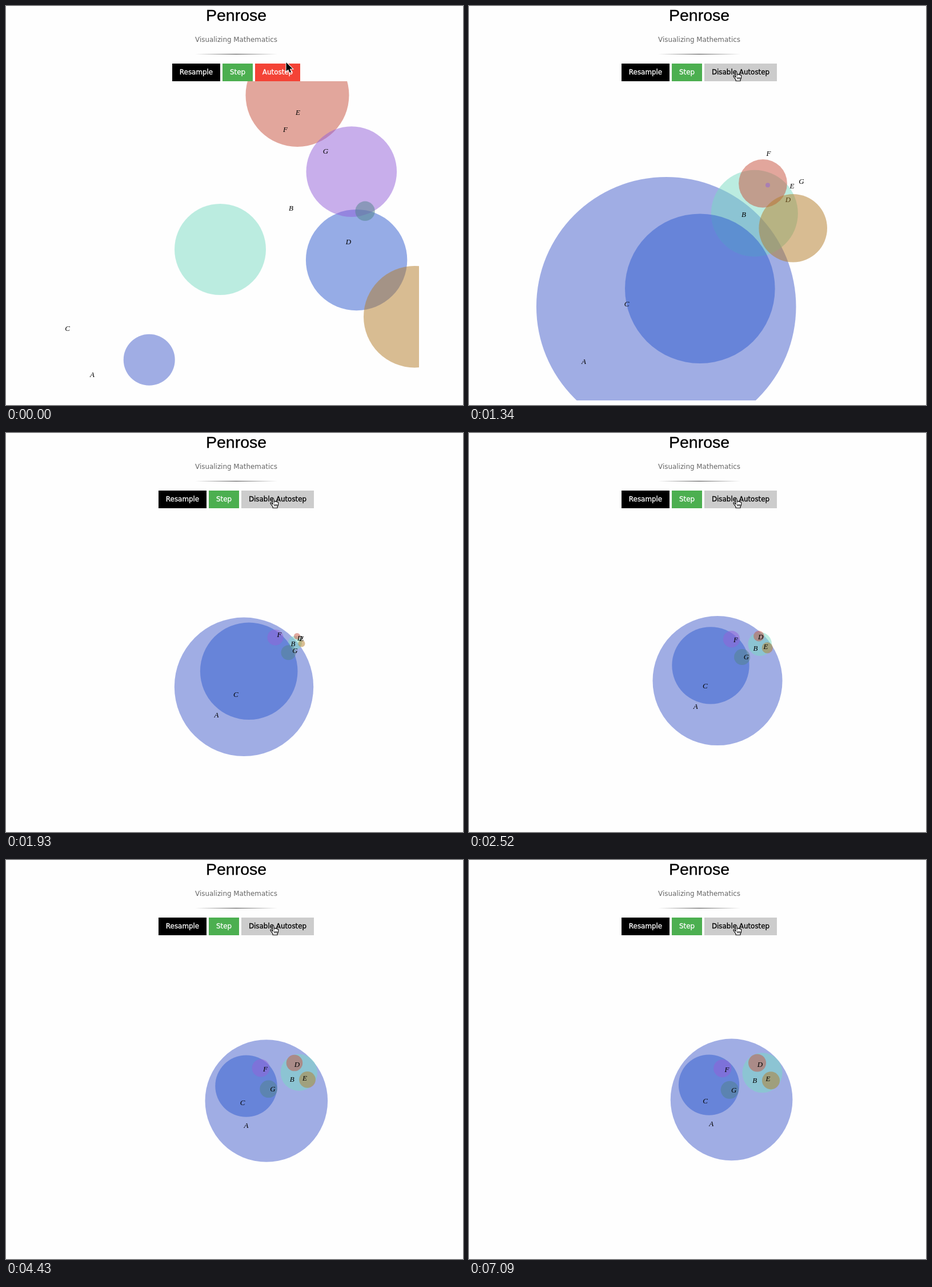
Animation, 800 px wide and 700 px high, one loop 7990 ms. Source, as an HTML page with a canvas:

```html
<!DOCTYPE html>
<html lang="en">
<head>
<meta charset="utf-8">
<title>Penrose</title>
<style>
html, body { margin: 0; width: 800px; height: 700px; overflow: hidden; background: #fefefe; }
canvas { display: block; }
</style>
</head>
<body>
<canvas id="stage" width="800" height="700"></canvas>
<script>
const ctx = document.getElementById('stage').getContext('2d');
const LOOP = 7990, START = 1340, STEP = 147.4, LAST = 39;
const NESTED = 4; // optimizer step at which every set has found its parent
const LEAF = 15.7; // settled radius of the innermost sets
const SANS = '11.9px "DejaVu Sans", Verdana, sans-serif';

// Circles are [x, y, radius]: random sample, first step, nested, settled.
// Labels are [x, y]; "seat" is the label's resting place in units of the radius.
const sets = [
  { name: 'A', rgb: '68,95,203', seat: [-0.33, 0.4],
    sample: [250.7, 620.7, 45], first: [345.2, 527.3, 227.3], nested: [416.5, 445.3, 121.7], settled: [459.9, 420.2, 106.8],
    sampleLabel: [151, 647], firstLabel: [201, 623.5] },
  { name: 'B', rgb: '123,219,195', seat: [-0.38, 0.38],
    sample: [375, 427, 80], first: [499.8, 363.8, 76], nested: [506, 368, 12], settled: [513.6, 373.3, 35.5],
    sampleLabel: [499, 355], firstLabel: [481, 366] },
  { name: 'C', rgb: '49,93,207', seat: [-0.12, 0.54],
    sample: [613.6, 445.6, 88.7], first: [404.3, 495.8, 131.3], nested: [425.2, 417.8, 85.3], settled: [420, 394.4, 53.1],
    sampleLabel: [107.5, 566], firstLabel: [276, 523] },
  { name: 'D', rgb: '199,81,61', seat: [0.32, 0.16],
    sample: [510, 156.5, 90.5], first: [514.5, 311.3, 42.4], nested: [509.5, 356.5, 5.5], settled: [504.5, 356, LEAF],
    sampleLabel: [599.5, 414], firstLabel: [558.5, 340] },
  { name: 'E', rgb: '179,125,41', seat: [-0.32, -0.19],
    sample: [715.2, 545.2, 89.2], first: [567.2, 389.8, 59.8], nested: [517.5, 369.5, 6], settled: [528.6, 387, LEAF],
    sampleLabel: [511, 187], firstLabel: [565.5, 316] },
  { name: 'F', rgb: '147,97,217', seat: [0.5, 0.12],
    sample: [604.8, 290.6, 79.3], first: [523, 314.2, 4], nested: [471.5, 358.7, 14], settled: [443.5, 365.6, LEAF],
    sampleLabel: [489, 217], firstLabel: [524.5, 258.5] },
  { name: 'G', rgb: '81,131,138', seat: [0.48, 0.03],
    sample: [628.6, 359.8, 17.2], first: [535, 345, 0], nested: [494.5, 385.3, 13], settled: [456, 403.5, LEAF],
    sampleLabel: [559.5, 254.5], firstLabel: [582, 308] },
];

const arrow = new Path2D('M0 0V15.5L3.6 12.2 6 17.8 8.6 16.7 6.2 11.2H11.2Z');
const hand = new Path2D('M4.5 11L1.8 8.2C.2 8 0 9.2 .8 10.2L4.6 15.5V17.5H12.5V15.5C14 13.5 14.5 11 14.3 8.2' +
  'C14.2 6.6 12 6.5 12 7.8C12 6 9.5 5.6 9.4 7C9.2 5.3 7 5 6.8 6.6L6.2 2C6 .2 3.7 .4 3.9 2Z');
const creases = new Path2D('M7.4 11v3.6M9.5 11v3.6M11.6 11v3.6');

const mix = (a, b, part) => a + (b - a) * part;

function text(str, x, y, font, color, weight = 0) {
  ctx.font = font;
  ctx.fillStyle = ctx.strokeStyle = color;
  ctx.fillText(str, x, y);
  if (weight) {
    ctx.lineWidth = weight;
    ctx.strokeText(str, x, y);
  }
}

function button(str, x, w, fill, color) {
  ctx.fillStyle = fill;
  ctx.fillRect(x, 101, w, 31);
  text(str, x + w / 2, 120, SANS, color, 0.3);
}

function drawHeader(t) {
  text('Penrose', 403, 26, '28.5px "Liberation Sans", Helvetica, Arial, sans-serif', '#000', 0.3);
  text('Visualizing Mathematics', 403, 63, SANS, '#666');
  const rule = ctx.createLinearGradient(331, 0, 475, 0);
  rule.addColorStop(0, 'rgba(0,0,0,0)');
  rule.addColorStop(0.5, 'rgba(0,0,0,.75)');
  rule.addColorStop(1, 'rgba(0,0,0,0)');
  ctx.fillStyle = rule;
  ctx.fillRect(331, 84, 144, 1);

  const running = t >= START, hover = t >= 890;
  const x = running ? 267 : 291;
  button('Resample', x, 84, '#000', '#fff');
  button('Step', x + 88, 53, '#4caf50', '#fff');
  button(running ? 'Disable Autostep' : 'Autostep', x + 145, running ? 127 : 79,
    hover ? '#ccc' : '#f44336', hover ? '#000' : '#fff');
}

// Quick jump into the parent set, then exponential settling
function circleAt({ first, nested, settled }, step) {
  if (step < NESTED) {
    const part = (1 - 0.6 ** step) / (1 - 0.6 ** NESTED);
    return first.map((v, k) => mix(v, nested[k], part));
  }
  const radiusDecay = nested[2] > settled[2] ? 0.82 : 0.89;
  const decay = [0.87, 0.87, radiusDecay];
  return settled.map((v, k) => mix(v, nested[k], decay[k] ** (step - NESTED)));
}

// The label drifts from its first place to its seat in the circle
function labelAt(set, circle, step) {
  return set.seat.map((seat, k) => {
    const gap = set.firstLabel[k] - set.first[k] - seat * set.first[2];
    return circle[k] + seat * circle[2] + gap * 0.58 ** step;
  });
}

function drawDiagram(t) {
  const step = Math.min(LAST, Math.floor((t - START + 11) / STEP));
  ctx.save();
  ctx.beginPath();
  ctx.rect(83, 132, 640, 560);
  ctx.clip();
  for (const set of sets) {
    const circle = t < START ? set.sample : circleAt(set, step);
    const [lx, ly] = t < START ? set.sampleLabel : labelAt(set, circle, step);
    ctx.fillStyle = `rgba(${set.rgb},.5)`;
    ctx.beginPath();
    ctx.arc(...circle, 0, 2 * Math.PI);
    ctx.fill();
    text(set.name, lx, ly + 4.2, 'italic 13px "Liberation Serif", Palatino, serif', '#000');
  }
  ctx.restore();
}

function drawCursor(t) {
  const pointing = t >= 890;
  const [x, y] = pointing ? [462.5, 114] : t >= 290 ? [478, 117] : t >= 150 ? [484, 108] : [490.5, 99];
  ctx.save();
  ctx.translate(x, y);
  ctx.lineWidth = pointing ? 1.1 : 2;
  ctx.strokeStyle = pointing ? '#000' : '#fff';
  ctx.fillStyle = pointing ? '#fff' : '#000';
  if (pointing) {
    ctx.fill(hand);
    ctx.stroke(hand);
    ctx.stroke(creases);
  } else {
    ctx.stroke(arrow);
    ctx.fill(arrow);
  }
  ctx.restore();
}

const begin = performance.now();
function draw() {
  const t = (performance.now() - begin) % LOOP;
  ctx.fillStyle = '#fefefe';
  ctx.fillRect(0, 0, 800, 700);
  ctx.textAlign = 'center';
  drawHeader(t);
  drawDiagram(t);
  drawCursor(t);
  requestAnimationFrame(draw);
}
draw();
</script>
</body>
</html>
```
